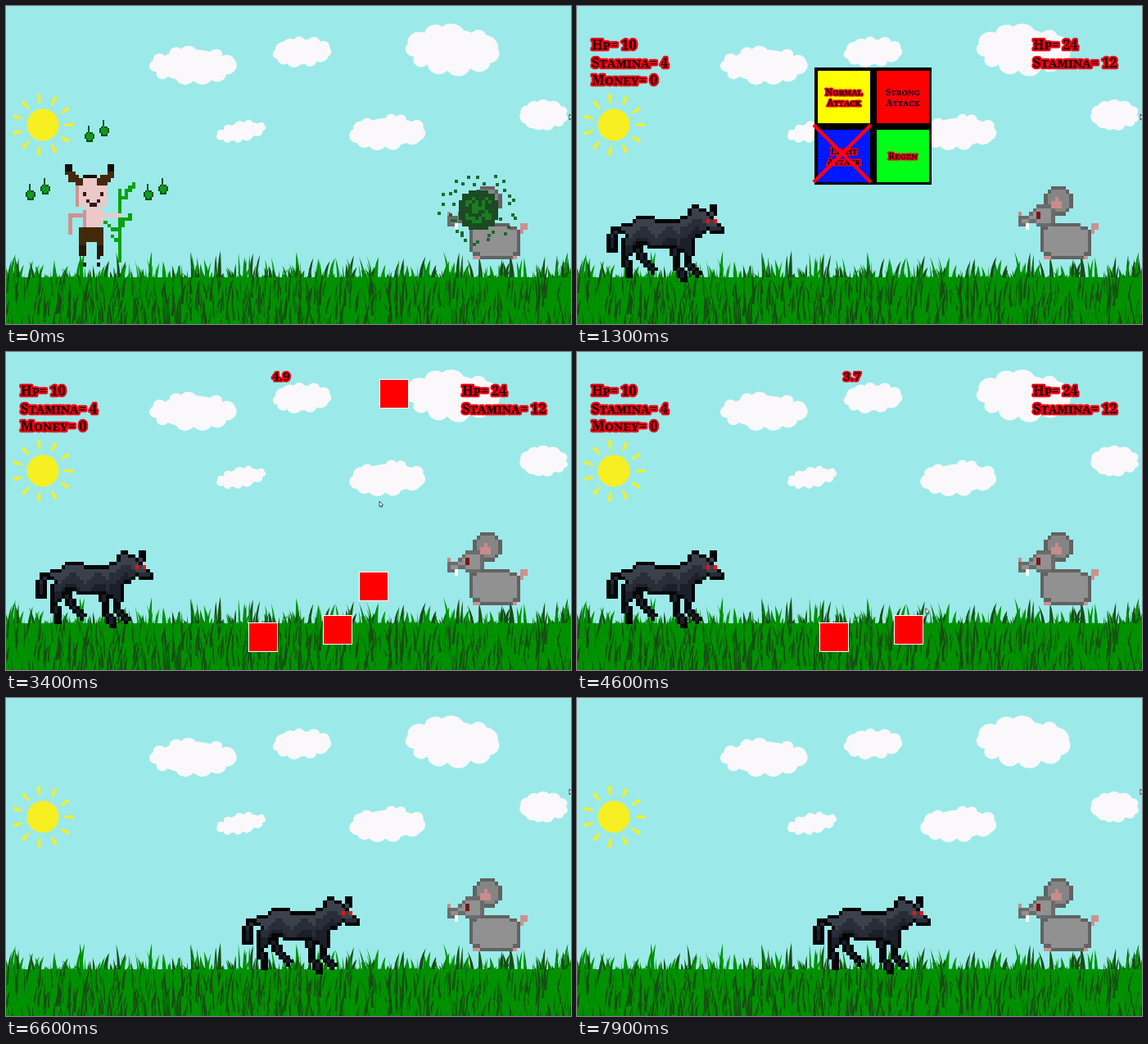
Write an HTML page with a canvas that moves like this. It is 690 px wide and 388 px high and loops after 8000 ms.

```html
<!DOCTYPE html>
<html lang="en">
<head>
<meta charset="utf-8">
<title>Pixel battle</title>
<style>
html, body { margin: 0; width: 100%; height: 100%; overflow: hidden; background: #9beae9; }
canvas { display: block; }
</style>
</head>
<body>
<canvas id="stage" width="690" height="388"></canvas>
<script>
const W = 690, H = 388, LOOP = 8000, TAU = Math.PI * 2;
const g = document.getElementById('stage').getContext('2d');

function seeded(s) {
  return () => (s = (s * 16807) % 2147483647) / 2147483647;
}

function makeLayer(w, h, draw) {
  const c = document.createElement('canvas');
  c.width = w;
  c.height = h;
  draw(c.getContext('2d'));
  return c;
}

// Rasterises thick strokes onto a coarse grid; cells on the rim take the edge colour.
// Each part is [fill, edge, ...[width, path]]; fill may be a function of the cell.
function sprite(cols, rows, cell, parts) {
  return makeLayer(Math.ceil(cols * cell), Math.ceil(rows * cell), c => {
    for (const [fill, edge, ...strokes] of parts) {
      let alpha;
      makeLayer(cols, rows, m => {
        m.lineCap = m.lineJoin = 'round';
        for (const [width, d] of strokes) {
          const path = new Path2D(d);
          m.lineWidth = width;
          m.stroke(path);
          if (d.endsWith('z')) m.fill(path);
        }
        alpha = m.getImageData(0, 0, cols, rows).data;
      });
      const solid = (x, y) => x >= 0 && y >= 0 && x < cols && y < rows && alpha[(y * cols + x) * 4 + 3] > 120;
      for (let y = 0; y < rows; y++)
        for (let x = 0; x < cols; x++) {
          if (!solid(x, y)) continue;
          const inside = solid(x - 1, y) && solid(x + 1, y) && solid(x, y - 1) && solid(x, y + 1);
          c.fillStyle = edge && !inside ? edge : typeof fill === 'function' ? fill(x, y) : fill;
          const l = Math.round(x * cell), t = Math.round(y * cell);
          c.fillRect(l, t, Math.round((x + 1) * cell) - l, Math.round((y + 1) * cell) - t);
        }
    }
  });
}

function disc(c, x, y, rx, ry = rx) {
  c.beginPath();
  c.ellipse(x, y, rx, ry, 0, 0, TAU);
  c.fill();
}

function cloud(c, x, y, rx, ry, turn, rnd) {
  const n = 11;
  c.save();
  c.translate(x, y);
  c.rotate(turn);
  disc(c, 0, 0, rx * .84, ry * .8);
  for (let i = 0; i < n; i++) {
    const a = (i + rnd() * .5) / n * TAU, r = ry * (.26 + rnd() * .2);
    disc(c, Math.cos(a) * (rx - r), Math.sin(a) * (ry - r), r * 1.15, r);
  }
  c.restore();
}

function sun(c) {
  c.save();
  c.translate(45, 145);
  c.fillStyle = '#f8ef22';
  disc(c, 0, 0, 19.5);
  c.rotate(-1.71);
  for (let i = 0; i < 11; i++) {
    c.beginPath();
    c.moveTo(26, -1);
    c.lineTo(37, -2.5);
    c.lineTo(38, 2);
    c.lineTo(26, 1);
    c.fill();
    c.rotate(TAU / 11);
  }
  c.restore();
}

function blade(c, x, y, h, lean, w, color) {
  c.fillStyle = color;
  c.beginPath();
  c.moveTo(x - w / 2, y);
  c.quadraticCurveTo(x - w / 2, y - h * .6, x + lean, y - h);
  c.quadraticCurveTo(x + w / 2, y - h * .5, x + w / 2, y);
  c.fill();
}

function grass(c) {
  const rnd = seeded(417), light = '#009100', dark = '#174d14';
  for (let i = 0; i < 520; i++)
    blade(c, rnd() * W, 338, 8 + rnd() ** 4 * 32, (rnd() - .5) * 13, 2.5 + rnd() * 3, rnd() < .6 ? light : dark);
  c.fillStyle = light;
  c.fillRect(0, 331, W, H - 331);
  for (let i = 0; i < 1500; i++) {
    const y = 350 + i * .05, h = 16 + rnd() * 26;
    blade(c, rnd() * W, y, h, (rnd() - .5) * 13, 1.5 + rnd() * 2, i % 5 < 2 ? dark : light);
  }
}

const scene = makeLayer(W, H, c => {
  const rnd = seeded(91);
  c.fillStyle = '#9beae9';
  c.fillRect(0, 0, W, H);
  c.fillStyle = '#faf8fa';
  cloud(c, 228, 72.5, 52, 24, 0, rnd);
  cloud(c, 361.5, 56, 35, 19, -.08, rnd);
  cloud(c, 545, 53.5, 56, 32, .06, rnd);
  cloud(c, 287, 153, 30, 13, -.2, rnd);
  cloud(c, 466, 154, 46, 22, -.06, rnd);
  cloud(c, 657, 133, 29, 19, 0, rnd);
  sun(c);
  grass(c);
});

function fur(x, y) {
  const depth = y + 1.3 * Math.sin(x * .85) - (x > 19 ? -2.5 : 0);
  return depth < 7 ? '#3b414b' : depth < 9.5 ? '#282d37' : '#1b1f29';
}

const INK = '#050607';
const wolf = sprite(32, 21, 4.5, [
  ['#1b1f29', INK, [2.4, 'M8.5 12L10 15L12.5 17.6'], [2.2, 'M18.5 11L18.8 17L21.2 19.7']],
  [fur, INK,
    [2.4, 'M6 6.5L2.5 7L1.5 9V12'],
    [8, 'M10 7.2L17 8.2L20 8.5'], [7, 'M20 7.5L24 5.5'], [5, 'M24 3.6L27 4'], [3.6, 'M27 5L30 6.6'],
    [2, 'M24 2V.8M29 2V.8'],
    [4.5, 'M7 8.5L6.3 11'], [2.5, 'M6 12L5 14.5L6.3 18.6'],
    [4, 'M21.5 10L22 12'], [2.4, 'M22.2 13V16L24.8 18.5']],
  ['#ff1010', null, [1, 'M27.5 4.5h.01M29.5 4.5h.01']]
]);

const rat = sprite(22, 20, 4.45, [
  ['#cf9090', null, [1, 'M19.5 13.5L21 12V9.5M7 19.5h4M15 19.5h4']],
  ['#919191', '#626262', [4, 'M8 12.5h9.5l.5 5h-9.5z']],
  ['#858585', '#626262', [8, 'M11 4h.01']],
  ['#c98b8b', null, [3, 'M10.5 4.5h.01']],
  ['#919191', '#6b6b6b', [3, 'M1.5 9.5L6 7.5'], [6, 'M6.5 8h.5']],
  ['#7a1418', null, [1, 'M5.5 7v2']],
  ['#c98b8b', null, [1, 'M.5 7.5h.01']],
  ['#fff', null, [1, 'M2.5 10.5v1']]
]);

const satyr = sprite(20, 31, 4.3, [
  ['#0ba20b', null, [1, 'M15.2 7V28M15.5 9.5h2V7.5M18.5 8v-1.5h1v-1M15 18.5h-2l-1.5-2M15.5 17.5h1v-2M17 15.5h1.5v-1M14 21.5l-.5-1']],
  ['#cf9393', null, [2, 'M4.2 5.2h5v6h-5z'], [1.3, 'M5.5 14.5H1.5V19'], [2, 'M6 14v3']],
  ['#ecc9c9', null, [2, 'M5.3 5.3h6v6h-6z'], [1, 'M6.5 12.5h3.5v5h-3.5z'], [1.3, 'M10 14.5h5.5']],
  [(x, y) => y < 2 ? '#130d09' : '#442909', null, [2.2, 'M1 1L2 3.5L4 5M13.4 1L12.4 3.5L10.4 5']],
  ['#130d09', null, [1, 'M5 3.5h4M5 27.5l1 2M9 27.5l1 2']],
  [(x, y) => y > 22 ? '#291604' : '#442909', null, [2, 'M5.2 18.8h5.2v2.5h-5.2z'], [1.6, 'M5 22v4M9.8 22v4']],
  ['#2f1616', null, [1, 'M5.5 8.5h.01M10.5 8.5h.01M6.5 10.5l1 1h1l1-1']]
]);

const flame = sprite(6, 10, 2, [
  ['#109a1e', '#07510f', [1, 'M2.5 .5v4'], [5.6, 'M3 6.6v.5']]
]);

function spell(step) {
  const rnd = seeded(53 + step);
  for (let y = -24; y < 24; y += 4)
    for (let x = -24; x < 24; x += 4) {
      const d = Math.hypot(x + 2, y + 2);
      if (d > 26) continue;
      g.fillStyle = d < 18 && rnd() > .4 ? '#1a7d22' : '#1b4a23';
      g.fillRect(577 + x, 249 + y, 4, 4);
    }
  g.fillStyle = '#1d6a2c';
  for (let i = 0; i < 36; i++) {
    const a = (i + rnd()) / 36 * TAU, r = 28 + rnd() * 22;
    g.fillRect(Math.round(573 + Math.cos(a) * r), Math.round(246 + Math.sin(a) * r * .94), 4, 4);
  }
}

// A bright core with a rim that is thick at the upper left and dented at the lower right.
function explosion(radius) {
  const rnd = seeded(29), cell = 4.5;
  const tones = ['#fff5df', '#ffd591', '#f5a94d', '#d9782a', '#743411'];
  for (let y = -63; y < 63; y += cell)
    for (let x = -63; x < 63; x += cell) {
      const a = Math.atan2(y, x);
      const edge = radius * (1 + .05 * Math.sin(a * 5 + 1) + .05 * Math.sin(a * 11) - .15 * Math.max(0, Math.cos(a - .75)) ** 3);
      const d = Math.hypot(x, y) / edge;
      if (d > 1) continue;
      const rim = .2 + .11 * Math.cos(a + 2.5) + (rnd() - .5) * .1;
      const k = Math.ceil((d - 1 + rim) / rim * 4);
      g.fillStyle = tones[Math.max(0, Math.min(4, k))];
      g.fillRect(Math.round(577 + x), Math.round(251 + y), 5, 5);
    }
}

function label(text, x, y, size, align = 'left', rim = size * .28) {
  g.font = `small-caps 900 ${size}px "Noto Serif", serif`;
  g.textAlign = align;
  g.lineJoin = 'round';
  g.lineWidth = rim;
  g.strokeStyle = '#f00014';
  g.strokeText(text, x, y);
  g.fillStyle = '#170205';
  g.fillText(text, x, y);
}

function stats() {
  ['Hp= 10', 'Stamina= 4', 'Money= 0'].forEach((s, i) => label(s, 18, 53 + i * 21.5, 16.5));
  ['Hp= 24', 'Stamina= 12'].forEach((s, i) => label(s, 557, 53 + i * 21.5, 16.5));
}

function menu() {
  const tiles = [['#ffff00', 'Normal', 'Attack'], ['#ff0000', 'Strong', 'Attack'], ['#0018ff', 'Light', 'Attack'], ['#00ff18', 'Regen']];
  g.fillStyle = '#000';
  g.fillRect(290, 75, 143, 143);
  tiles.forEach(([color, ...lines], i) => {
    const x = 294 + i % 2 * 72, y = 79 + (i >> 1) * 72;
    g.fillStyle = color;
    g.fillRect(x, y, 64, 64);
    lines.forEach((s, j) => label(s, x + 32, y + 42.5 - lines.length * 6.5 + j * 13, 11, 'center'));
  });
  g.strokeStyle = '#ff0018';
  g.lineWidth = 4.5;
  g.beginPath();
  g.moveTo(289, 145);
  g.lineTo(359, 215);
  g.moveTo(359, 145);
  g.lineTo(289, 215);
  g.stroke();
}

// Left, top and the time of the click that removes the square.
const squares = [[457, 34, 3800], [432, 269, 4400], [388, 322, 4800], [297, 331, 5500]];

function clickGame(t) {
  for (const [x, y, end] of squares) {
    if (t >= end) continue;
    g.fillStyle = '#fff';
    g.fillRect(x - 1, y - 1, 36, 36);
    g.fillStyle = '#f00';
    g.fillRect(x, y, 34, 34);
  }
  label((8.3 - t / 1000).toFixed(1), 336, 35, 15, 'center');
}

// The pointer picks a menu tile, visits every square and rests at the right side.
const pointer = [
  [1900, 688, 132], [2600, 398, 112], [3400, 456, 182],
  ...squares.map(([x, y, end]) => [end, x + 16, y + 17]),
  [5700, 696, 190], [6500, 688, 111]
];

function along(keys, t) {
  const next = keys.findIndex(k => k[0] > t);
  if (next <= 0) return keys.at(next).slice(1);
  const [a, b] = [keys[next - 1], keys[next]], p = (t - a[0]) / (b[0] - a[0]);
  return [a[1] + (b[1] - a[1]) * p, a[2] + (b[2] - a[2]) * p];
}

const arrow = new Path2D('M0 0V7L1.6 5.4L2.7 7.6L3.6 7L2.7 5L4.5 4.6z');

function cursor([x, y]) {
  g.save();
  g.translate(x, y);
  g.fillStyle = '#fff';
  g.fill(arrow);
  g.strokeStyle = '#223';
  g.lineWidth = .8;
  g.stroke(arrow);
  g.restore();
}

// Charge, pause at the rat, then back away at the same speed.
function wolfX(t) {
  const speed = .24, reach = 372;
  return 36 + Math.max(0, Math.min(speed * (t - 5550), reach, reach - speed * (t - 7400)));
}

function draw(t) {
  g.drawImage(scene, 0, 0);
  g.drawImage(rat, 539, 220);

  if (t < 400) {
    const lift = Math.round(3 * Math.sin(t / 130));
    g.drawImage(satyr, 72, 193);
    for (const [x, y] of [[24, 217], [96, 146], [168, 217]]) {
      g.drawImage(flame, x, y - lift);
      g.drawImage(flame, x + 18, y - 7 + lift);
    }
    spell(t / 100);
  } else {
    g.drawImage(wolf, Math.round(wolfX(t)), 242);
  }

  if (t >= 400 && t < 900) {
    explosion(Math.min(59, 34 + (t - 400) * .085));
    if (t >= 600) label('-6', 554, 287, 32, 'center', 6);
  }
  if (t >= 1000 && t < 5500) stats();
  if (t >= 1000 && t < 2600) menu();
  if (t >= 2600 && t < 5500) clickGame(t);
  cursor(along(pointer, t));
}

function tick(now) {
  draw(Math.floor(now % LOOP / 100) * 100);
  requestAnimationFrame(tick);
}
requestAnimationFrame(tick);
</script>
</body>
</html>
```
